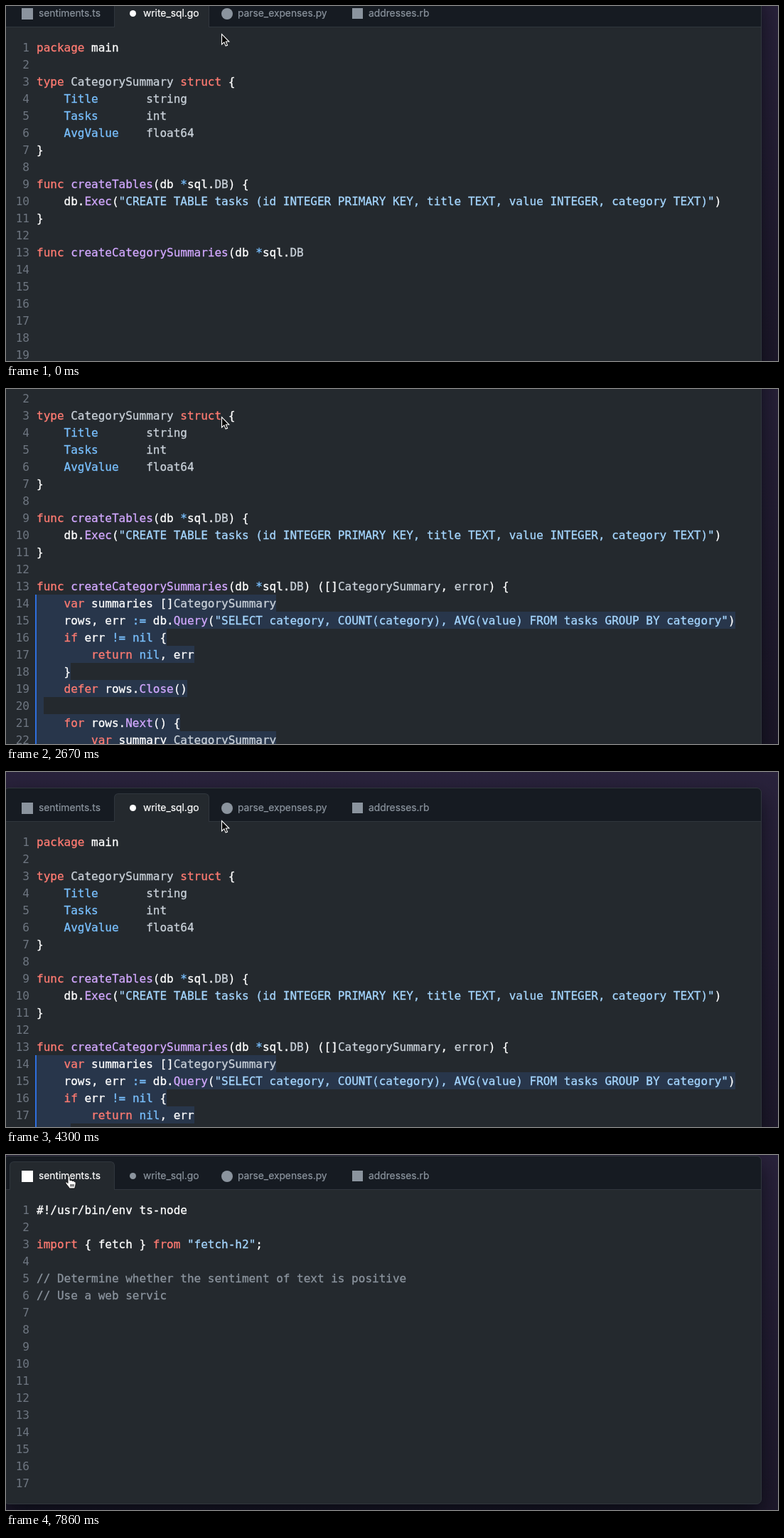
These frames come from a looping animation (1086 px wide and 499 px high, 8000 ms). An HTML page:

```html
<!DOCTYPE html>
<html lang="en">
<head>
<meta charset="utf-8">
<title>Code editor</title>
<style>
html, body { margin: 0; width: 100%; height: 100%; overflow: hidden; background: #1a1626; }
#stage { position: relative; width: 1086px; height: 499px; overflow: hidden; }
#page { position: absolute; inset: -80px 0 -140px; background: linear-gradient(#2a233d, #231d33 45%, #1a1626); }
#window {
  position: absolute; left: -3px; top: 62px; width: 1066px; height: 640px;
  box-sizing: border-box; overflow: hidden; border: 1px solid #30363d; border-radius: 7px;
  background: #24292e; box-shadow: 0 14px 30px rgba(1, 4, 9, .65);
}
#window.short { height: 490px; }
#bar { position: absolute; inset: 0 0 auto; height: 46px; background: #161b22; border-bottom: 1px solid #30363d; }
.tab {
  position: absolute; top: 7px; height: 39px; box-sizing: border-box;
  border: 1px solid transparent; border-bottom: 0; border-radius: 6px 6px 0 0;
  color: #8b949e; font: 13.8px/39px Inter, sans-serif; white-space: nowrap;
  -webkit-text-stroke: .2px;
}
.tab.active { height: 40px; color: #fff; background: #24292e; border-color: #30363d; }
.tab span { position: absolute; top: 0; left: 40px; }
.tab i { position: absolute; background: currentColor; }
.tab .round { border-radius: 50%; }
.code { position: absolute; top: 63px; left: 0; font: 16px/26px "DejaVu Sans Mono", "Liberation Mono", monospace; color: #fff; }
.line { height: 24px; white-space: pre; }
.line > b { display: inline-block; width: 35px; margin-right: 10px; text-align: right; font-weight: 400; color: #6e7681; vertical-align: top; }
.line > span { display: inline-block; height: 24px; overflow: hidden; vertical-align: top; -webkit-text-stroke: .3px; }
.hint > span { margin-left: -2px; border-left: 2px solid #2f6fde; background: #28364b; }
.key { color: #ff7b72; }
.const { color: #79c0ff; }
.text { color: #a5d6ff; }
.name { color: #d2a8ff; }
.type { color: #c9d1d9; }
.note { color: #8b949e; }
#cursor { position: absolute; left: 0; top: 0; overflow: visible; }
</style>
</head>
<body>
<div id="stage">
  <div id="page">
    <div id="window">
      <div id="bar"></div>
      <div class="code" id="go"></div>
      <div class="code" id="ts"></div>
    </div>
  </div>
  <svg id="cursor" width="20" height="20">
    <path id="arrow" d="M0 0V14.5L3.4 11.4L5.6 16.6L8 15.6L5.8 10.5H10.3Z" fill="#000" stroke="#fff" stroke-width="1.1"/>
    <path id="hand" d="M-2 0C-2 -2 1 -2 1 0V5C2 4.2 4 4.4 4.2 5.6C5.5 5 7 5.4 7.2 6.6C8.6 6.4 9.3 7.2 9.2 9C9 12 8.2 13 7.8 16H0C-.5 13.5 -3.5 11.5 -5 8.5C-5.6 6.8 -3.8 6.5 -2.5 8L-2 8.5ZM2 10V13.5M4 10V13.5M6 10V13.5"
      fill="#fff" stroke="#111" stroke-width="1" stroke-linejoin="round"/>
  </svg>
</div>
<script>
const LOOP = 8000, STEP = 148.1;
const $ = id => document.getElementById(id);

const goSource = `package main

type CategorySummary struct {
    Title       string
    Tasks       int
    AvgValue    float64
}

func createTables(db *sql.DB) {
    db.Exec("CREATE TABLE tasks (id INTEGER PRIMARY KEY, title TEXT, value INTEGER, category TEXT)")
}

func createCategorySummaries(db *sql.DB) ([]CategorySummary, error) {
    var summaries []CategorySummary
    rows, err := db.Query("SELECT category, COUNT(category), AVG(value) FROM tasks GROUP BY category")
    if err != nil {
        return nil, err
    }
    defer rows.Close()
 
    for rows.Next() {
        var summary CategorySummary`;

const tsSource = `#!/usr/bin/env ts-node

import { fetch } from "fetch-h2";

// Determine whether the sentiment of text is positive
// Use a web servic`;

const syntax = new RegExp([
  '(?<note>//.*)',
  '(?<text>"[^"]*")',
  '(?<key>\\b(?:package|type|struct|func|var|if|return|defer|for|import|from)\\b)',
  '(?<const>\\b(?:nil|Title|Tasks|AvgValue)\\b|:=|!=|\\*)',
  '(?<type>\\b(?:CategorySummary|string|int|float64|DB|error)\\b)',
  '(?<name>\\b(?:create\\w+|Exec|Query|Close|Next)\\b)'
].join('|'), 'g');

function highlight(line) {
  return line.replace(syntax, (token, ...rest) => {
    const groups = rest[rest.length - 1];
    const kind = Object.keys(groups).find(k => groups[k] !== undefined);
    return `<span class="${kind}">${token}</span>`;
  });
}

// Fills an editor pane and returns the code part of each line.
function buildCode(pane, source, count) {
  const lines = source.split('\n');
  for (let i = 0; i < count; i++) {
    const row = document.createElement('div');
    row.className = 'line';
    row.innerHTML = `<b>${i + 1}</b><span>${highlight(lines[i] || '')}</span>`;
    pane.append(row);
  }
  return [...pane.querySelectorAll('.line > span')];
}

function addTab(label, left, width, iconX, labelX, size, round) {
  const tab = document.createElement('div');
  tab.className = 'tab';
  tab.style.cssText = `left:${left + 2}px;width:${width}px`;
  tab.innerHTML = `<i class="${round ? 'round' : ''}"></i><span>${label}</span>`;
  const [icon, text] = tab.children;
  icon.style.cssText = `left:${iconX - left - 1 - size / 2}px;top:${19.5 - size / 2}px;width:${size}px;height:${size}px`;
  text.style.left = labelX - left - 1 + 'px';
  $('bar').append(tab);
  return tab;
}

const tsTab = addTab('sentiments.ts', 5, 148, 30, 46, 16, false);
const goTab = addTab('write_sql.go', 152, 134, 178, 193, 9, true);
addTab('parse_expenses.py', 286, 183, 311, 326, 16, true);
addTab('addresses.rb', 469, 143, 494, 510, 15, false);

const goLines = buildCode($('go'), goSource, 24);
const tsLines = buildCode($('ts'), tsSource, 17);
const hints = goLines.slice(13, 22);

// Tracks of [step, value], linear between points.
const scroll = [[15, 0], [16, 14], [17, 52], [18, 69], [20, 69], [23, 66], [24, 52], [25, 26],
  [26, -2], [27, -24], [28, -36], [29, -40], [30, -39], [34, -23], [35, -23], [37, -19]];
const pointerX = [[29, 303.5], [34, 210], [38, 210], [41, 89]];
const pointerY = [[27, 39.5], [29, 68.5], [34, 64], [38, 64], [41, 31]];

function sample(track, step) {
  const next = track.findIndex(p => p[0] >= step);
  if (next < 0) return track[track.length - 1][1];
  if (next === 0) return track[0][1];
  const [s0, v0] = track[next - 1], [s1, v1] = track[next];
  return v0 + (v1 - v0) * (step - s0) / (s1 - s0);
}

const reveal = (el, chars) => { el.style.width = Math.max(0, chars) + 'ch'; };
const show = (el, on) => { el.style.display = on ? '' : 'none'; };

function draw(step) {
  const onTs = step >= 42;
  show($('go'), !onTs);
  show($('ts'), onTs);
  goTab.classList.toggle('active', !onTs);
  tsTab.classList.toggle('active', onTs);
  $('window').classList.toggle('short', onTs);

  reveal(goLines[12], Math.min(69, 39 + step * 5));
  const shown = Math.floor((step - 8) * 1.6);
  hints.forEach((el, i) => {
    el.parentNode.classList.toggle('hint', i < shown);
    show(el, i < shown);
  });

  const typed = Math.round((step - 42) / 11 * 74);
  reveal(tsLines[4], Math.min(54, typed));
  reveal(tsLines[5], Math.min(19, typed - 55));

  $('page').style.transform = `translateY(${-Math.round(sample(scroll, step))}px)`;
  $('cursor').style.transform = `translate(${sample(pointerX, step)}px, ${sample(pointerY, step)}px)`;
  show($('arrow'), step < 41);
  show($('hand'), step >= 41);
}

function tick() {
  draw(Math.min(53, Math.floor(performance.now() % LOOP / STEP)));
  requestAnimationFrame(tick);
}
tick();
</script>
</body>
</html>
```
